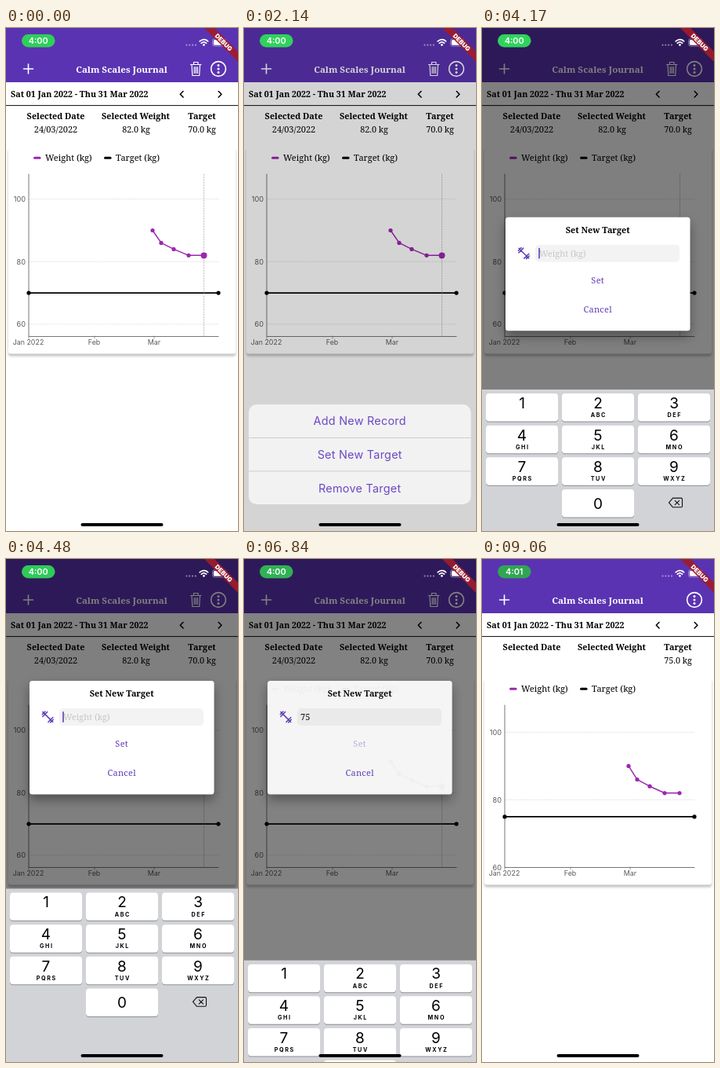
These frames come from a looping animation (296 by 640 pixels, 9.11 s). An HTML page:

```html
<!DOCTYPE html>
<html lang="en">
<head>
<meta charset="utf-8">
<title>Weight chart</title>
<style>
  html, body { margin: 0; width: 100%; height: 100%; overflow: hidden; background: #fff; }
  svg { display: block; width: 100vw; height: 100vh; }
  text { font-family: "Noto Serif", "Liberation Serif", serif; font-size: 10.8px; }
  .b { font-weight: 700; }
  .ui { font-family: Inter, "Liberation Sans", sans-serif; }
  .m { text-anchor: middle; }
  .e { text-anchor: end; }
  .line { fill: none; stroke-linecap: round; stroke-linejoin: round; }
  .card { filter: drop-shadow(0 3px 1.5px rgba(0,0,0,.24)); }
  .box { filter: drop-shadow(0 7px 7px rgba(0,0,0,.36)); }
</style>
</head>
<body>
<svg id="stage" viewBox="0 0 296 640" preserveAspectRatio="none"></svg>
<script>
const LOOP = 9110;
const PURPLE = '#5a33b2', INK = '#5f3cb8', SERIES = '#9c27b0';
const KB_TOP = 419, KB_H = 221;

// Runs of picture changes: first time, last time, count
const runs = [
  [0, 0, 1], [110, 440, 4], [580, 910, 4], [1050, 1480, 5], [1630, 1770, 2],
  [1920, 2360, 5], [2500, 2970, 5], [3120, 3440, 4], [3580, 4170, 6], [4270, 4480, 3],
  [4600, 5480, 9], [5580, 5580, 1], [5730, 5850, 2], [5990, 6430, 5], [6570, 6710, 2],
  [6840, 6950, 2], [7050, 7590, 6], [7690, 8590, 9], [8700, 8700, 1], [8840, 9060, 3]
];
const ticks = runs.flatMap(([a, b, n]) =>
  Array.from({ length: n }, (_, i) => n > 1 ? Math.round(a + (b - a) * i / (n - 1)) : a));
const hold = t => ticks.reduce((last, k) => k <= t ? k : last, 0);

const clamp = v => Math.max(0, Math.min(1, v));
const ramp = (t, start, dur) => clamp((t - start) / dur);
const easeOut = (p, n = 2) => 1 - (1 - p) ** n;
const spring = ms => { const x = Math.max(0, ms) * .0171; return 1 - (1 + x) * Math.exp(-x); };

// Text placed by the middle of its capitals
const text = (s, x, y, { c = '', size = 10.8, fill = '#000', more = '' } = {}) =>
  `<text class="${c}" x="${x}" y="${(y + size * .36).toFixed(2)}" fill="${fill}" style="font-size:${size}px;${more}">${s}</text>`;
const rect = (x, y, w, h, fill, r = 0, more = '') =>
  `<rect x="${x}" y="${y}" width="${w}" height="${h}" fill="${fill}" rx="${r}" ${more}/>`;
const path = (d, stroke, w = 1, more = '') =>
  `<path class="line" d="${d}" stroke="${stroke}" stroke-width="${w}" ${more}/>`;
const dot = (x, y, r, fill, more = '') =>
  `<circle cx="${x}" cy="${y}" r="${r}" fill="${fill}" ${more}/>`;

function header() {
  return rect(0, 0, 296, 69, PURPLE) +
    path('M22.5 52H34.5M28.5 46V58', '#fff', 1.6) +
    text('Calm Scales Journal', 147.5, 53, { c: 'b m', size: 11.6, fill: '#fff' }) +
    `<g id="trash">${path('M235.5 46.5H249M239.5 46V43.5H245V46M237 47L237.8 60.5H246.7L247.5 47M240.2 49.5V57.5M242.3 49.5V57.5M244.4 49.5V57.5', '#fff', 1.2)}</g>` +
    dot(271, 52, 9.4, 'none', 'stroke="#fff" stroke-width="1.6"') +
    [47.5, 52, 56.5].map(y => dot(271, y, 1.5, '#fff')).join('');
}

function summary() {
  return text('Sat 01 Jan 2022 - Thu 31 Mar 2022', 6, 84, { c: 'b', size: 10.7 }) +
    path('M226 80.5L222.3 84.3L226 88.1M271.2 80.5L274.9 84.3L271.2 88.1', '#000', 1.5) +
    rect(0, 98, 296, 1.1, '#222') +
    text('Selected Date', 63.5, 112, { c: 'b m' }) +
    text('Selected Weight', 165.5, 112, { c: 'b m' }) +
    text('Target', 250, 112, { c: 'b m' }) +
    `<g id="picked">${text('24/03/2022', 63.5, 129, { c: 'm', size: 11 })}${text('82.0 kg', 166, 129, { c: 'm' })}</g>` +
    text('<tspan id="goal"></tspan>', 250, 129, { c: 'm' });
}

const weights = [[187, 90], [198, 86], [214, 84], [233, 82], [252, 82]];

function plot(id, y80, unit, goal) {
  const yOf = v => y80 - (v - 80) * unit;
  const levels = [100, 80, 60].map(v =>
    path(`M29 ${yOf(v)}H271`, '#dcdcdc', .8, 'stroke-dasharray="1 1.6"') +
    text(v, 25, yOf(v), { c: 'ui e', size: 9.2, fill: '#5a5a5a' })).join('');
  const marks = weights.map(([x, v]) => dot(x, yOf(v), 2.6, SERIES, 'class="mark"')).join('') +
    [29, 271].map(x => dot(x, yOf(goal), 2.6, '#000', 'class="mark"')).join('');
  return `<g id="${id}">${levels}
    ${path('M29 186V392.5H271', '#777', 1)}
    <g clip-path="url(#${id}Clip)">
      ${path('M' + weights.map(([x, v]) => `${x} ${yOf(v)}`).join('L'), SERIES, 1.5)}
      ${path(`M29 ${yOf(goal)}H271`, '#000', 1.6)}
    </g>${marks}</g>`;
}

function chart() {
  const months = [['Jan 2022', 28.5, 29], ['Feb', 112.5, 113], ['Mar', 189, 189]];
  return rect(3, 151, 290, 263.5, '#fff', 3, 'class="card"') + rect(0, 140, 296, 15, '#fff') +
    rect(35, 163.7, 9.5, 3, SERIES, 1.5) + text('Weight (kg)', 50, 165, { size: 11 }) +
    rect(125, 163.7, 9.5, 3, '#000', 1.5) + text('Target (kg)', 140, 165, { size: 11 }) +
    months.map(([s, x, tick]) => path(`M${tick} 392V395`, '#888', .8) +
      text(s, x, 400, { c: 'ui m', size: 8.9, fill: '#5a5a5a' })).join('') +
    plot('before', 297.3, 3.98, 70) + plot('after', 306.4, 4.3, 75) +
    `<g id="track">${path('M252.5 186V392', '#b5b5b5', .8, 'stroke-dasharray="1.5 1.8"')}${dot(252.5, 0, 4, SERIES, 'id="trackDot"')}</g>`;
}

function sheet() {
  const rows = ['Add New Record', 'Set New Target', 'Remove Target'];
  return `<g id="sheet">${rect(6, 479, 283.5, 127, '#f2f2f3', 10)}
    ${rect(6, 521, 283.5, .8, '#c6c6c9')}${rect(6, 563.5, 283.5, .8, '#c6c6c9')}
    ${rows.map((s, i) => text(s, 147.7, 500 + i * 42.7, { c: 'ui m', size: 14.4, fill: '#6c49c1', more: 'letter-spacing:.25px' })).join('')}</g>`;
}

function dialog() {
  const action = { c: 'm', size: 11, fill: INK, more: 'letter-spacing:.3px' };
  return `<g id="dialog">${rect(30, 0, 235.5, 144.5, '#fff', 3.5, 'class="box"')}
    ${text('Set New Target', 147.7, 16.5, { c: 'b m' })}
    <g transform="translate(53.3 46) rotate(45)">${path('M-9 0H9M-5 -4.2V4.2M5 -4.2V4.2M-7.3 -2.6V2.6M7.3 -2.6V2.6', INK, 1.5)}</g>
    ${rect(68, 35, 184, 22, '#f3f3f4', 5)}
    <g id="hint">${text('Weight (kg)', 73, 46, { size: 11, fill: '#c6c6c9' })}</g>
    ${text('<tspan id="entry"></tspan>', 72, 46, { size: 11 })}
    ${rect(0, 39, 1.6, 14, INK, .8, 'id="caret"')}
    <g id="set">${text('Set', 147.7, 80.5, action)}</g>${text('Cancel', 147.7, 117, action)}</g>`;
}

function keyboard() {
  const letters = ['', 'ABC', 'DEF', 'GHI', 'JKL', 'MNO', 'PQRS', 'TUV', 'WXYZ'];
  const key = (n, col, row) => {
    const x = 5 + col * 97, y = 5 + row * 40.7, mid = x + 46;
    return rect(x, y + 1, 92, 35.5, '#8d8f94', 4) +
      rect(x, y, 92, 35.5, '#fff', 4, `id="key${n}"`) +
      text(n, mid, y + (n ? 12 : 18), { c: 'ui m', size: 19 }) +
      text(letters[n - 1] || '', mid + .8, y + 27.5, { c: 'ui m', size: 7.2, more: 'font-weight:700;letter-spacing:1.6px' });
  };
  const keys = letters.map((_, i) => key(i + 1, i % 3, Math.floor(i / 3))).join('') + key(0, 1, 3);
  return `<g id="keyboard">${rect(0, 0, 296, KB_H + 2, '#d1d3d6')}${keys}
    ${path('M238.5 144L243.5 138.2H254Q255.5 138.2 255.5 139.7V148.3Q255.5 149.8 254 149.8H243.5ZM246.2 141.3L251.6 146.7M251.6 141.3L246.2 146.7', '#111', 1.1)}</g>`;
}

function status() {
  return [230.5, 234.3, 238.1, 241.9].map(x => dot(x, 21.7, 1.1, '#fff', 'opacity=".45"')).join('') +
    path('M247.2 16.9Q252.4 12.2 257.6 16.9M249.2 19.3Q252.4 16.5 255.6 19.3', '#fff', 1.7) +
    dot(252.4, 21.5, 1.4, '#fff') +
    rect(263.5, 13.7, 17.5, 9.4, 'none', 2.6, 'stroke="#fff" stroke-opacity=".5" stroke-width=".8"') +
    rect(264.8, 15, 15, 6.8, '#fff', 1.5) +
    `<g transform="translate(296 0) rotate(45)">${rect(-45, 21.2, 90, 9.2, 'rgba(160,28,44,.92)')}
      ${text('DEBUG', 0, 25.8, { c: 'ui m', size: 7.9, fill: '#fff', more: 'font-weight:900' })}</g>` +
    rect(20, 8, 42.5, 16.5, '#32d25c', 8.2, 'id="pill"') +
    text('<tspan id="clock"></tspan>', 41.2, 16.2, { c: 'ui m', size: 10.9, fill: '#fff', more: 'font-weight:600' });
}

const stage = document.getElementById('stage');
stage.innerHTML = `<defs>
  <clipPath id="beforeClip"><rect x="29" y="180" width="243" height="213"/></clipPath>
  <clipPath id="afterClip"><rect id="reveal" x="29" y="180" width="0" height="213"/></clipPath></defs>` +
  rect(0, 0, 296, 640, '#fff') + header() + summary() + chart() +
  rect(0, 0, 296, 640, '#000', 0, 'id="dim"') + sheet() + dialog() + status() + keyboard() +
  rect(95.5, 630, 105, 4, '#000', 2);

const ui = {};
stage.querySelectorAll('[id]').forEach(el => ui[el.id] = el);
const newMarks = ui.after.querySelectorAll('.mark');
const show = (el, on) => el.setAttribute('visibility', on ? 'visible' : 'hidden');
const fade = (el, v) => el.setAttribute('opacity', v.toFixed(3));
const move = (el, y) => el.setAttribute('transform', `translate(0 ${y.toFixed(2)})`);

function caretOn(t) {
  const since = [5850, 5480, 4000].find(k => t >= k);
  return since && t < 6710 && (t - since) % 1000 < 500;
}

function draw(t) {
  const saved = t >= 6950;

  show(ui.trash, !saved);
  show(ui.picked, !saved);
  ui.goal.textContent = saved ? '75.0 kg' : '70.0 kg';
  ui.clock.textContent = t < 8700 ? '4:00' : '4:01';
  const glow = .5 + .5 * Math.cos((t - 200) / 1000 * Math.PI);
  ui.pill.setAttribute('fill', `rgb(48,${Math.round(164 + 46 * glow)},${Math.round(82 + 10 * glow)})`);

  // Chart: the lines are wiped in from the left, then the markers grow
  show(ui.before, !saved);
  show(ui.after, saved);
  show(ui.track, t < 7250);
  ui.trackDot.setAttribute('cy', saved ? 325.5 : 289.4);
  ui.trackDot.setAttribute('r', saved ? 3.6 : 4);
  ui.reveal.setAttribute('width', 243 * ramp(t, 7100, 1050));
  const grow = easeOut(ramp(t, 8225, 225));
  newMarks.forEach(m => m.setAttribute('r', 2.6 * grow));

  const sheetUp = easeOut(ramp(t, 1500, 335), 3.5) * (1 - easeOut(ramp(t, 2450, 335), 3.5));
  show(ui.sheet, sheetUp > .001);
  move(ui.sheet, 161 * (1 - sheetUp));

  const open = ramp(t, 2640, 150) * (1 - ramp(t, 6820, 150));
  show(ui.dialog, open > 0);
  fade(ui.dialog, easeOut(open, 1.3));
  move(ui.dialog, 254 - 99 * easeOut(ramp(t, 4163, 100)));
  fade(ui.dim, 1 - (1 - .17 * sheetUp) * (1 - .5 * easeOut(open)));

  const entry = t < 5480 ? '' : t < 5850 ? '7' : '75';
  ui.entry.textContent = entry;
  show(ui.hint, open > 0 && !entry);
  show(ui.caret, open > 0 && caretOn(t));
  ui.caret.setAttribute('x', 72.2 + entry.length * 6.1);
  fade(ui.set, t >= 6710 ? .4 : 1);

  const up = spring(t - 3989) * (1 - spring(t - 6757));
  show(ui.keyboard, up > .002);
  move(ui.keyboard, KB_TOP + KB_H * (1 - up));
  const press = (key, from, to) => key.setAttribute('fill', t >= from && t < to ? '#b2b5bd' : '#fff');
  press(ui.key7, 5360, 5480);
  press(ui.key5, 5730, 5850);
}

const begin = performance.now();
function tick() {
  draw(hold((performance.now() - begin) % LOOP));
  requestAnimationFrame(tick);
}
tick();
</script>
</body>
</html>
```
